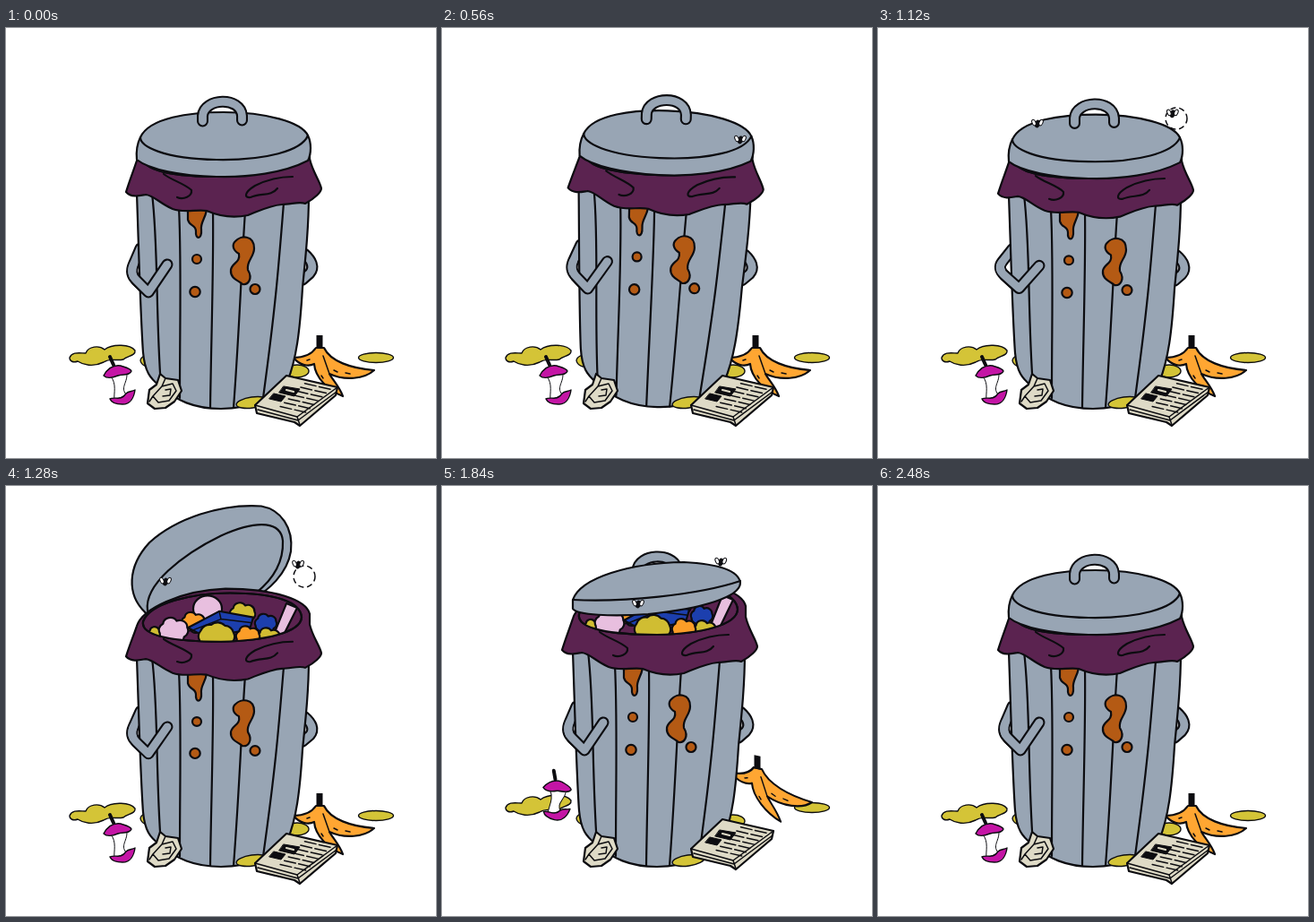
An HTML page that plays this animation: 480x480 px, repeating every 2.56 s.

```html
<!DOCTYPE html>
<html>
<head>
<meta charset="utf-8">
<style>
html, body { margin: 0; height: 100%; overflow: hidden; background: #fff; }
svg { display: block; width: 100vw; height: 100vh; }
path, ellipse, circle { stroke: #0c0c10; stroke-width: 2.2; stroke-linejoin: round; stroke-linecap: round; }
.metal { fill: #98a5b4; }
.bag { fill: #5b2350; }
.line { fill: none; }
.thin { fill: none; stroke-width: 1.5; }
.rust { fill: #b45a14; stroke-width: 1.8; }
.goo { fill: #d4c437; }
.goo > * { stroke-width: 1.4; }
.paper { fill: #dedac6; }
.apple { fill: #c415a5; stroke-width: 1.4; }
.peel { fill: #ffa632; }
.ink { fill: #0c0c10; stroke-width: 1; }
.wing { fill: #fff; stroke-width: 1; }
.edge { fill: none; stroke-width: 13; }
.tube { fill: none; stroke: #98a5b4; stroke-width: 8.8; }
.handle { stroke-linecap: square; }
.trail { fill: none; stroke-width: 1.5; stroke-dasharray: 5 5; }
</style>
</head>
<body>
<svg viewBox="0 0 480 480">
  <defs>
    <path id="mouth" d="M153 143C160 122 207 110 250 110C300 110 329 120 330 138C329 155 290 165 240 166C190 166 150 160 153 143Z"/>
    <clipPath id="inside"><use href="#mouth"/></clipPath>
    <g id="fly">
      <ellipse class="ink" rx="2.2" ry="4" transform="rotate(15)"/>
      <g class="wings">
        <ellipse class="wing" cx="-3" cy="-3" rx="2" ry="3.5" transform="rotate(-25)"/>
        <ellipse class="wing" cx="3" cy="-3" rx="2" ry="3.5" transform="rotate(25)"/>
      </g>
    </g>
  </defs>

  <g id="puddles" class="goo">
    <path d="M71 368C74 361 82 363 89 363C92 355 104 354 110 359C119 352 139 353 144 360C145 366 135 366 131 370C122 372 117 368 109 373C97 379 86 376 80 372C75 374 71 372 71 368Z"/>
    <ellipse cx="413" cy="368" rx="19.5" ry="5.5"/>
    <ellipse cx="325" cy="383" rx="13" ry="7"/>
  </g>
  <g class="goo">
    <path d="M150 371C151 365 162 363 169 366C180 371 189 379 188 387C180 392 174 381 166 379C157 379 151 377 150 371Z"/>
  </g>

  <g id="banana">
    <path class="peel" d="M346 357C340 366 330 368 321 368C328 377 338 378 344 375C345 390 360 405 376 411C372 400 364 392 361 386C378 394 400 392 411 382C385 380 362 372 355 357Z"/>
    <path class="thin" d="M354 366L361 386M366 382L370 384M379 385L384 386M336 371L339 370M352 388L354 391"/>
    <path class="line" style="stroke-width:7;stroke-linecap:butt" d="M350 343V358"/>
  </g>

  <g id="can">
    <g id="openLid">
      <path class="metal" d="M155 132C135 112 135 80 160 52C190 24 240 7 285 10C307 14 321 35 318 62C314 88 292 108 276 116L160 138Z"/>
      <path class="line" d="M158 130C154 101 196 66 240 44C284 24 307 29 309 50C310 76 296 96 279 110"/>
    </g>
    <g data-tube="M333 252C341 259 345 267 339 274L331 281"></g>
    <path class="edge armBack"/><path class="tube armBack"/>
    <path class="metal" d="M146 185C148 240 150 320 153 362C155 384 161 391 171 399C190 416 210 425 240 425C275 425 300 411 314 395C324 370 328 340 331 290C335 250 338 220 338 185Z"/>
    <path class="line" d="M163 185C170 240 167 320 173 400M193 200C196 260 194 330 194 413M231 204C232 260 229 350 228 424M267 205C263 260 261 330 254 424M310 195C304 270 301 310 287 413"/>
    <g class="rust">
      <path d="M203 203H224C222 214 217 217 218 225C219 237 211 236 212 227C212 219 205 222 203 214Z"/>
      <circle cx="213" cy="258" r="5"/>
      <circle cx="211" cy="294.5" r="5.7"/>
      <circle cx="278" cy="291.5" r="5.5"/>
      <path d="M256 238C262 231 277 231 277 246C277 256 268 260 270 270C276 280 270 287 264 286C260 282 250 280 251 270C252 262 262 262 260 252C253 248 252 242 256 238Z"/>
    </g>

    <path class="bag" d="M146 148C142 160 138 170 134 183C140 190 150 187 156 186C165 187 172 196 186 202C200 207 212 202 224 204C240 211 255 212 270 209C285 203 295 198 308 197C318 197 328 193 334 196C345 190 352 183 352 179C350 170 342 160 339 146V134C335 118 300 105 245 105C195 107 152 128 146 148Z"/>
    <path class="line" d="M176 163C185 170 200 174 207 181C208 188 198 192 191 189M320 166C305 166 290 170 278 176C265 184 266 190 273 189C285 184 296 188 303 179"/>
    <use href="#mouth" class="bag"/>
    <g id="trash" clip-path="url(#inside)"></g>
    <use href="#mouth" fill="none"/>

    <path class="edge" id="armFront"/><path class="tube" id="armFill"/>

    <g id="ajarLid">
      <g data-tube="M218 94C220 75 257 74 262 91"></g>
      <path class="metal" d="M146 127C155 102 210 86 270 85C310 87 331 95 333 108C333 124 290 137 230 143C190 146 150 144 146 137Z"/>
      <path class="line" d="M146 127C200 130 285 122 333 106"/>
    </g>
    <g id="shutLid">
      <path class="metal" d="M150 122C160 100 205 94 243 94C290 94 330 105 337 120C341 128 341 140 337 148C310 162 270 167 235 166C195 165 160 158 146 147C145 137 147 128 150 122Z"/>
      <path class="line" d="M150 122C150 132 175 146 235 147C290 148 330 137 337 120"/>
      <g class="handle" data-tube="M219.5 104V98C221 78 262 76 263.5 98V103"></g>
    </g>
  </g>

  <g class="goo"><ellipse cx="275" cy="418" rx="18" ry="6" transform="rotate(-8 275 418)"/></g>
  <path class="paper" d="M172 386L178 391L192 393L196 405L188 417L178 424L166 425L158 419L160 404L168 398Z"/>
  <path class="thin" d="M178 391L174 400L186 397L190 405L182 416L170 418L164 411L174 400M178 404L184 403L183 410L175 411M164 411L160 417"/>
  <g id="news">
    <path class="paper" d="M313 388L370 401L368 410L328 444L322 440L280 430L278 421Z"/>
    <path class="thin" d="M278 421L325 434L370 401M281 426L326 438L369 406M325 434L328 443"/>
    <path class="thin" id="print"/>
    <path class="ink" d="M310 400L328 403L322 411L305 407ZM299 408L312 411L307 417L294 414Z"/>
    <path class="line" style="stroke:#dedac6" d="M313 404L321 406"/>
  </g>
  <g id="apple">
    <path class="wing" d="M117 389C124 397 120 408 121 415L135 410C127 402 135 397 135 387Z"/>
    <path class="apple" d="M109 388C114 379 121 376 128 377C134 379 139 380 140 383C138 388 132 386 125 388C118 391 112 391 109 388Z"/>
    <path class="apple" d="M116 414C122 411 128 417 134 408C137 405 141 406 144 404C143 412 139 420 130 420C124 420 118 419 116 414Z"/>
    <path class="line" style="stroke-width:4" d="M116 367L120 376"/>
  </g>

  <path class="trail" id="leftTrail" d="M183 124C184 133 176 139 183 152"/>
  <circle class="trail" id="rightTrail" cx="333" cy="101" r="12"/>
  <use id="leftFly" href="#fly"/>
  <use id="rightFly" href="#fly"/>
</svg>
<script>
const STEP = 80, FRAMES = 32;
const $ = id => document.getElementById(id);
const mix = (a, b, k) => a.map((v, i) => v + (b[i] - v) * k);
const show = (id, on) => $(id).style.display = on ? '' : 'none';
const place = (id, x, y, extra = '') => $(id).setAttribute('transform', `translate(${x} ${y}) ${extra}`);
const ease = x => { x = Math.min(1, Math.max(0, x)); return x * x * (3 - 2 * x); };
// Rises from step a to b, holds until c, falls back by d.
const bump = (n, a, b, c, d) => ease((n - a) / (b - a)) * ease((d - n) / (d - c));

for (const g of document.querySelectorAll('[data-tube]'))
  g.innerHTML = ['edge', 'tube'].map(c => `<path class="${c}" d="${g.dataset.tube}"/>`).join('');

// A lump with rounded lobes around its rim.
function cloud(x, y, r, fill, lobes = 6) {
  let d = '';
  for (let i = 0; i <= lobes; i++) {
    const a = i / lobes * 2 * Math.PI - .3;
    const at = `${x + r * Math.cos(a)} ${y + r * .7 * Math.sin(a)}`;
    d += i ? `A${r * .52} ${r * .5} 0 0 1 ${at}` : `M${at}`;
  }
  return `<path d="${d}" fill="${fill}"/>`;
}

const PINK = '#e8bfdf', BLUE = '#1c3fae', YELLOW = '#d0bd32', ORANGE = '#fb9d28';
$('trash').innerHTML =
  `<ellipse cx="225" cy="128" rx="16" ry="15" fill="${PINK}"/>` +
  cloud(264, 134, 14, YELLOW) + cloud(209, 144, 13, ORANGE) +
  `<path d="M313 122L325 127L309 160L300 155Z" fill="${PINK}"/>` +
  cloud(290, 145, 12, BLUE) +
  `<path d="M203 150L238 131L276 138L272 152L224 161Z" fill="${BLUE}"/>` +
  '<path class="thin" d="M208 153L240 140L273 144M240 140L238 131"/>' +
  cloud(168, 158, 10, YELLOW) + cloud(187, 153, 16, PINK) +
  cloud(235, 160, 20, YELLOW, 8) + cloud(293, 162, 13, YELLOW) + cloud(270, 160, 13, ORANGE);

// Printed lines run along the slanted page.
const page = (a, b) => `${313 + 57 * a - 35 * b} ${388 + 13 * a + 33 * b}`;
let lines = '';
for (let row = .1; row < .9; row += .13)
  lines += `M${page(.42, row)}L${page(.64, row)}M${page(.7, row)}L${page(.92, row)}`;
$('print').setAttribute('d', lines);

const armRest = [[150, 246], [138, 274], [159, 295], [180, 264]];
const armOut = [[150, 243], [118, 248], [153, 274], [180, 264]];

function poseArm(k) {
  const [shoulder, elbow, wrist, hand] = armRest.map((p, i) => mix(p, armOut[i], k));
  const above = mix(elbow, shoulder, .35), below = mix(elbow, wrist, .35);
  const lower = `${below}L${wrist}L${hand}`, bend = `${above}Q${elbow} ${lower}`;
  for (const path of document.querySelectorAll('.armBack')) path.setAttribute('d', `M${shoulder}L${bend}`);
  $('armFront').setAttribute('d', 'M' + lower);
  $('armFill').setAttribute('d', 'M' + bend);
}

function draw(n) {
  const lean = bump(n, 0, 4, 4, 8);
  const tall = 1 + .018 * bump(n, 8, 11, 11, 14) - .03 * bump(n, 13, 16, 16, 17) + .02 * bump(n, 16, 17, 17, 20);
  place('can', lean, -12 * lean, `rotate(${9.8 * lean} 240 425) translate(0 ${425 * (1 - tall)}) scale(1 ${tall})`);
  poseArm(bump(n, 8, 11, 12, 15) + .9 * bump(n, 23, 27, 28, 31));

  const gap = bump(n, 14, 16, 21, 23) + bump(n, 22, 24, 29, 31);
  show('openLid', gap > .8);
  show('ajarLid', gap > .1 && gap <= .8);
  show('shutLid', gap <= .1);

  const hop = bump(n, 21, 23, 27, 30);
  place('apple', hop, -48 * hop, `rotate(${14 * hop} 125 398)`);
  place('banana', 2 * hop, -42 * hop, `translate(350 344) skewY(${12 * hop}) translate(-350 -344)`);
  place('news', 0, -16 * hop);
  place('puddles', 0, -9 * hop);

  const roam = bump(n, 16, 23, 23, 33);
  place('leftFly', 178 + 41 * roam, 107 + 25 * roam);
  place('rightFly', 333 - .085 * (n - 7) ** 2, 105 + 24 * Math.cos((n - 4) / FRAMES * 2 * Math.PI));
  show('leftFly', n > 9 && n < 30);
  show('rightFly', n > 2 && n < 30);
  show('leftTrail', n > 9 && n < 14);
  show('rightTrail', n > 13 && n < 19);
}

function tick() {
  draw(Math.floor(performance.now() / STEP) % FRAMES);
  requestAnimationFrame(tick);
}
tick();
</script>
</body>
</html>
```
